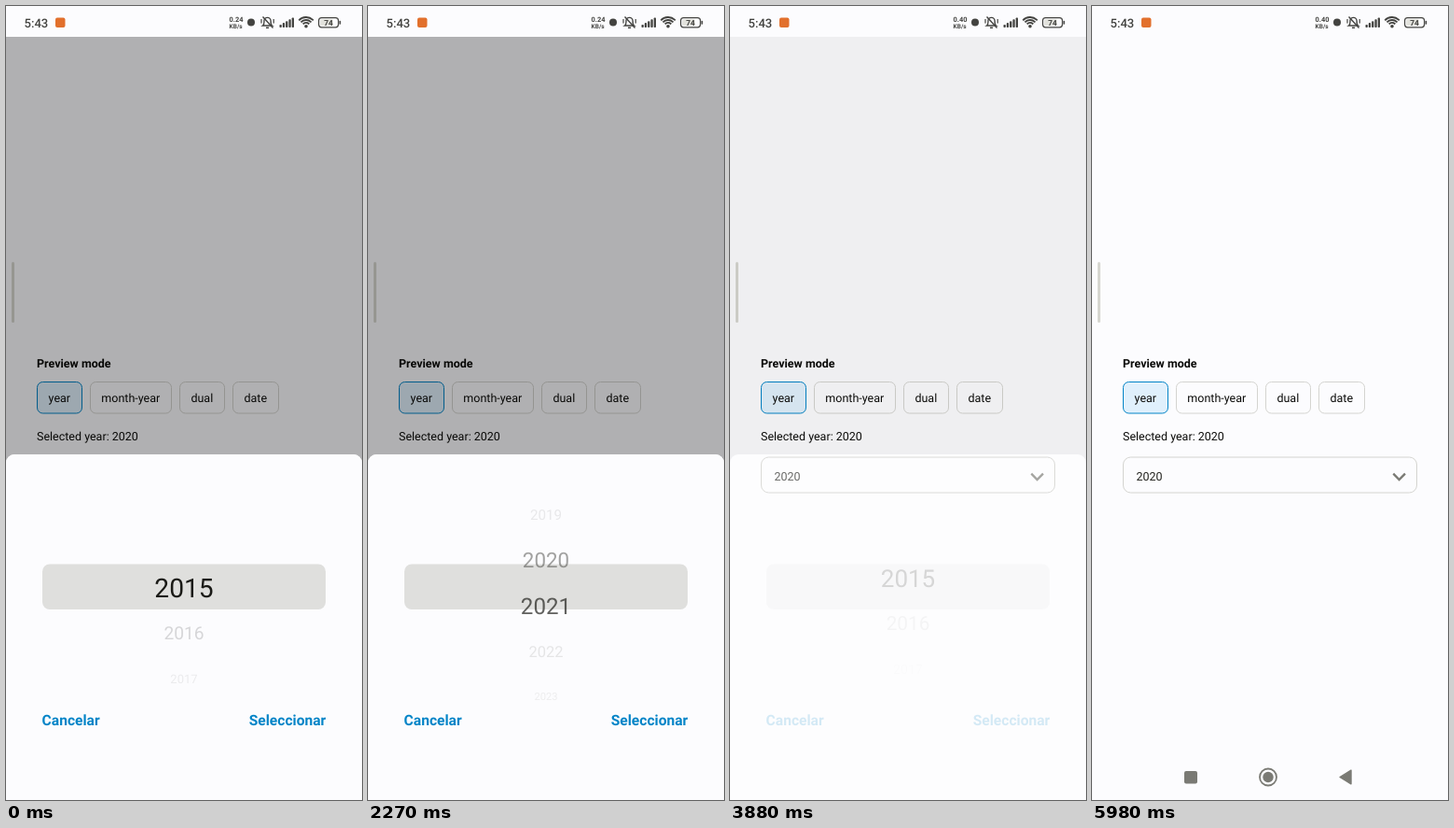
These frames come from a looping animation (382x850 px, 6.1 s). An HTML page with a canvas:

```html
<!DOCTYPE html>
<html lang="es">
<head>
<meta charset="utf-8">
<title>Year picker</title>
<style>
  html, body { margin: 0; width: 100%; height: 100%; overflow: hidden; background: #fcfcfe; }
  canvas { display: block; width: 382px; height: 850px; }
</style>
</head>
<body>
<canvas id="stage" width="382" height="850"></canvas>
<script>
const ctx = document.getElementById('stage').getContext('2d');
const W = 382, H = 850, LOOP = 6100;
const PAPER = '#fcfcfe', INK = '#434340', GREY = '#7a7a74', LINE = '#d4d4d0', BLUE = '#0284c7';
const FIRST_YEAR = 2015, ROW = 48.7, CENTER = 622.5, BODY = 12.5;

const ramp = (t, from, to) => Math.max(0, Math.min(1, (t - from) / (to - from)));
const smooth = p => p * p * (3 - 2 * p);

// Opacities over the loop: the picker closes, opens again and closes.
const modalAlpha = t => 1 - ramp(t, 2930, 3165) + ramp(t, 3840, 4090) - ramp(t, 4670, 4920);
const navAlpha = t => ramp(t, 2920, 3060) - ramp(t, 3740, 3860) + ramp(t, 4660, 4760);
const confirmAlpha = t =>
  1 - 0.78 * (ramp(t, 2830, 2930) - ramp(t, 3400, 3500) + ramp(t, 4520, 4660));
const fieldAlpha = t => 1 - 0.55 * (ramp(t, 3530, 3690) - ramp(t, 3690, 3980));

// First a swipe past the year and back, later an automatic scroll to it.
function wheelPosition(t) {
  if (t > 3500) return FIRST_YEAR + 5 * smooth(ramp(t, 3844, 4144));
  return FIRST_YEAR + 7.2 * smooth(ramp(t, 0, 1490)) - 2.2 * smooth(ramp(t, 1490, 2680));
}

function text(str, x, y, size, color = '#0c0c0a', weight = 400, align = 'left') {
  ctx.font = `${weight} ${size}px Roboto, sans-serif`;
  ctx.textRendering = 'geometricPrecision';
  ctx.textAlign = align;
  ctx.fillStyle = color;
  ctx.fillText(str, x, y);
}

function box(x, y, w, h, r, fill, stroke, width = 1) {
  ctx.beginPath();
  ctx.roundRect(x, y, w, h, r);
  if (fill) { ctx.fillStyle = fill; ctx.fill(); }
  if (stroke) { ctx.strokeStyle = stroke; ctx.lineWidth = width; ctx.stroke(); }
}

function line(points, color, width) {
  ctx.beginPath();
  points.forEach(([x, y]) => ctx.lineTo(x, y));
  ctx.strokeStyle = color;
  ctx.lineWidth = width;
  ctx.stroke();
}

function disc(x, y, r, color) {
  ctx.beginPath();
  ctx.arc(x, y, r, 0, Math.PI * 2);
  ctx.fillStyle = color;
  ctx.fill();
}

function ring(x, y, r, color, width, from = 0, to = Math.PI * 2) {
  ctx.beginPath();
  ctx.arc(x, y, r, from, to);
  ctx.strokeStyle = color;
  ctx.lineWidth = width;
  ctx.stroke();
}

function faded(alpha, draw) {
  if (alpha <= 0) return;
  ctx.save();
  ctx.globalAlpha *= alpha;
  draw();
  ctx.restore();
}

function mutedBell() {
  ctx.beginPath();
  ctx.moveTo(275.5, 21);
  ctx.quadraticCurveTo(277, 20, 277, 16.5);
  ctx.arc(280.5, 16, 3.6, Math.PI, 0);
  ctx.quadraticCurveTo(284, 20, 285.5, 21);
  ctx.closePath();
  ctx.strokeStyle = INK;
  ctx.lineWidth = 1.4;
  ctx.stroke();
  line([[279, 23.3], [282, 23.3]], INK, 1.5);
  line([[275.5, 11.5], [286.5, 23.5]], INK, 1.4);
  for (const x of [274, 287.2]) line([[x, 14], [x, 18.5]], INK, 1.2);
}

function statusBar(t) {
  text('5:43', 19.5, 22.6, 13.1, INK, 500);
  box(53, 12.5, 10.5, 10.5, 2, '#e2702c');
  text(t < 2960 ? '0.24' : '0.40', 239.6, 16.8, 7.4, INK, 700);
  text('KB/s', 239.6, 23.8, 6.5, INK, 700);
  disc(263, 17.5, 4, INK);
  mutedBell();
  for (let i = 0; i < 5; i++) {
    const h = 3 + i * 1.9;
    box(293.5 + i * 3.3, 23 - h, 2.3, h, 0.8, INK);
  }
  for (const r of [4.6, 7.6, 10.6]) ring(322, 22.6, r, INK, 1.8, -Math.PI * 0.76, -Math.PI * 0.24);
  disc(322, 21.8, 1.8, INK);
  box(335.6, 12.6, 21, 10.2, 3, PAPER, INK, 1.2);
  box(337.2, 14.2, 13.8, 7, 1.5, '#e2e2dc');
  box(357.6, 15.8, 1.6, 4, 0.8, INK);
  text('74', 346, 20.9, 8.4, INK, 700, 'center');
}

function chip(label, x, w, active) {
  box(x + 0.5, 402.5, w - 1, 33.5, 6, active && '#e0f0fc', active ? BLUE : LINE);
  text(label, x + w / 2 - 0.2, 423.8, BODY, undefined, 400, 'center');
}

function page(t) {
  box(6, 274, 3, 65, 1.5, '#d6d6d0');
  text('Preview mode', 33, 386.8, BODY, '#080806', 700);
  chip('year', 33, 49, true);
  chip('month-year', 90, 88);
  chip('dual', 186, 49);
  chip('date', 243, 50);
  text('Selected year: 2020', 33, 465, BODY);
  box(33.5, 483, 315, 38, 8, null, LINE);
  faded(fieldAlpha(t), () => {
    text('2020', 47.5, 508.3, BODY, '#22221e');
    line([[323.3, 500.6], [329.6, 507], [336, 500.6]], GREY, 2.3);
  });
}

function navigation() {
  box(99, 819, 14, 13.5, 2, GREY);
  ring(189, 825.5, 9, GREY, 1.8);
  disc(189, 825.5, 5.7, GREY);
  ctx.beginPath();
  ctx.moveTo(266, 825.5);
  ctx.lineTo(278, 818.2);
  ctx.lineTo(278, 832.8);
  ctx.closePath();
  ctx.lineJoin = 'round';
  ctx.fillStyle = ctx.strokeStyle = GREY;
  ctx.lineWidth = 1.4;
  ctx.fill();
  ctx.stroke();
}

const sheetPath = () => ctx.roundRect(0, 480, W, H - 480, [9, 9, 0, 0]);

function backdrop() {
  ctx.beginPath();
  ctx.rect(0, 33, W, H - 33);
  sheetPath();
  ctx.fillStyle = 'rgba(0, 0, 0, 0.3)';
  ctx.fill('evenodd');
}

function wheel(position) {
  box(39, 597.5, 304, 48.5, 8, '#dfdfdd');
  ctx.save();
  ctx.beginPath();
  ctx.rect(39, 500, 304, 244);
  ctx.clip();
  const start = Math.max(FIRST_YEAR, Math.floor(position) - 3);
  for (let year = start; year <= position + 3; year++) {
    const offset = year - position, distance = Math.abs(offset);
    const size = 28.2 * 0.68 ** distance;
    const strength = 0.06 + 0.94 / (1 + (2 * distance) ** 3);
    const y = CENTER + offset * ROW + size * 0.36;
    faded(strength, () => text(year, 191, y, size, '#1a1a16', 400, 'center'));
  }
  ctx.restore();
}

function modal(t) {
  backdrop();
  ctx.beginPath();
  sheetPath();
  ctx.fillStyle = PAPER;
  ctx.fill();
  wheel(wheelPosition(t));
  text('Cancelar', 38.6, 770.3, 15.6, BLUE, 600);
  faded(confirmAlpha(t), () => text('Seleccionar', 343.3, 770.3, 15.6, BLUE, 600, 'right'));
}

function render(t) {
  ctx.fillStyle = PAPER;
  ctx.fillRect(0, 0, W, H);
  page(t);
  faded(modalAlpha(t), () => modal(t));
  faded(navAlpha(t), navigation);
  statusBar(t);
}

const began = performance.now();
function tick() {
  render((performance.now() - began) % LOOP);
  requestAnimationFrame(tick);
}
tick();
</script>
</body>
</html>
```
